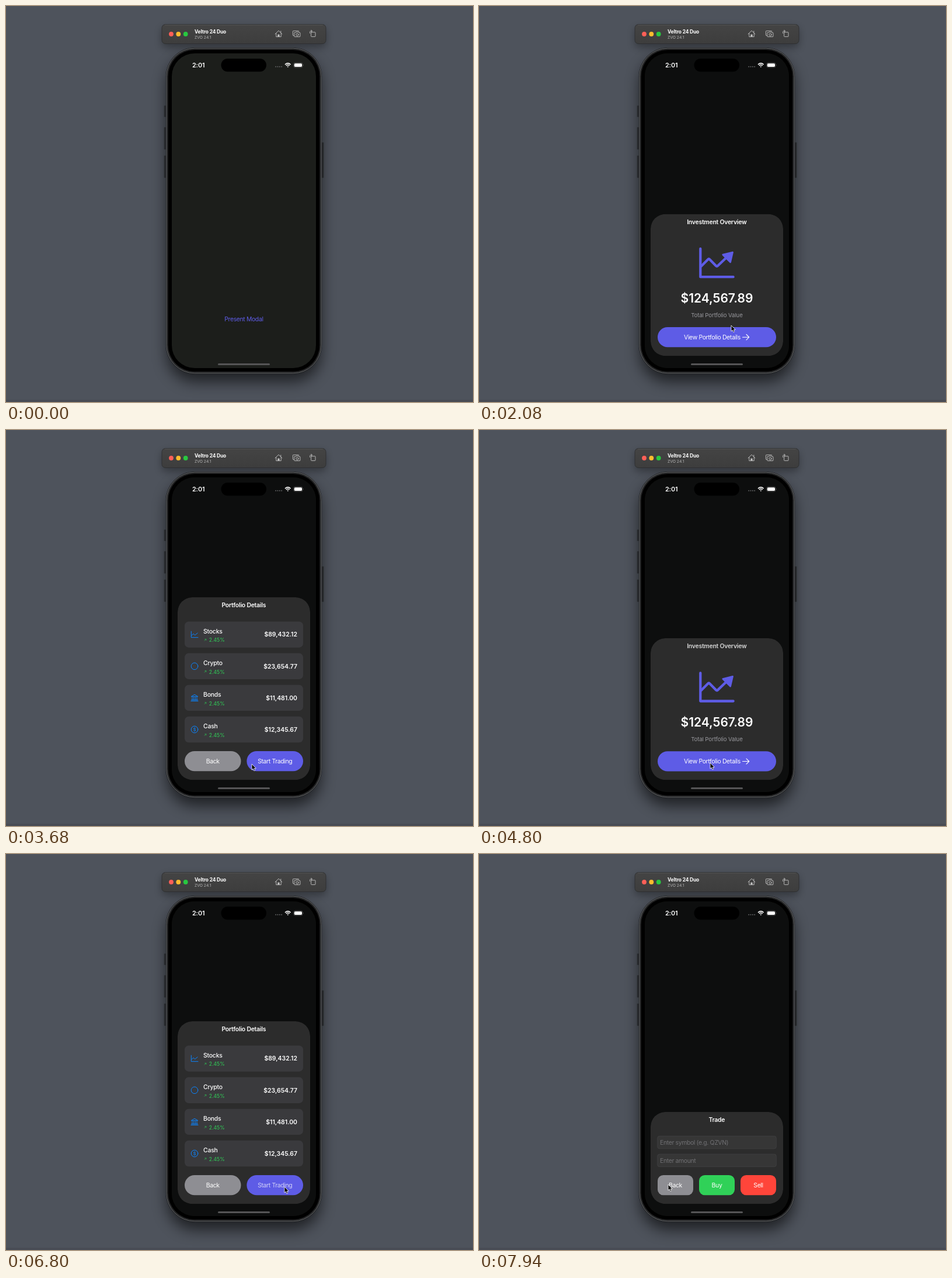
An HTML page for the animation above (8 s loop, 800 px wide and 677 px high).

```html
<!DOCTYPE html>
<html lang="en">
<head>
<meta charset="utf-8">
<title>Sheet demo</title>
<style>
  html, body { margin: 0; width: 100%; height: 100%; overflow: hidden; background: #4e535c; }
  svg { display: block; width: 100vw; height: 100vh; }
  text { font-family: Inter, Roboto, sans-serif; font-size: 10.45px; letter-spacing: -.035em; fill: #fff; }
  .mid { text-anchor: middle; }
  .end { text-anchor: end; letter-spacing: 0; }
  .semi { font-weight: 600; }
  .title { font-weight: 600; letter-spacing: -.023em; }
  .medium { font-weight: 500; letter-spacing: -.02em; }
  .line { fill: none; stroke-linecap: round; stroke-linejoin: round; }
</style>
</head>
<body>
<svg viewBox="0 0 800 677" preserveAspectRatio="none">
  <defs>
    <filter id="blur" x="-30%" y="-30%" width="160%" height="160%"><feGaussianBlur stdDeviation="13"/></filter>
    <filter id="soft" x="-20%" y="-80%" width="140%" height="300%"><feGaussianBlur stdDeviation="7"/></filter>
    <linearGradient id="bar" x2="0" y2="1"><stop stop-color="#444"/><stop offset="1" stop-color="#3d3d3d"/></linearGradient>
    <clipPath id="screenClip"><rect x="284" y="81" width="247" height="538" rx="39"/></clipPath>
    <clipPath id="cardClip"><rect id="clipRect" x="294" width="227" rx="25"/></clipPath>
  </defs>

  <rect width="800" height="677" fill="#4e535c"/>
  <rect y="673" width="800" height="4" fill="#484c55"/>

  <!-- window bar -->
  <rect x="267" y="37" width="281" height="34" rx="7" fill="#000" opacity=".32" filter="url(#soft)"/>
  <rect x="276" y="86" width="263" height="556" rx="48" fill="#000" opacity=".62" filter="url(#blur)"/>
  <rect x="267" y="31.5" width="281" height="33" rx="6" fill="url(#bar)" stroke="#2b2c2e" stroke-width=".8"/>
  <path d="M272 32.4H543" stroke="#626262" stroke-width=".6"/>
  <circle cx="283" cy="48" r="3.9" fill="#ff5f57"/>
  <circle cx="295.3" cy="48" r="3.9" fill="#febc2e"/>
  <circle cx="307.7" cy="48" r="3.9" fill="#28c840"/>
  <text x="323" y="47" style="font-size:8.4px;font-weight:700;letter-spacing:-.015em">Veltro 24 Duo</text>
  <text x="323" y="55.6" style="font-size:6.8px;letter-spacing:0;fill:#b4b4b4">ZVO 24.1</text>
  <g class="line" stroke="#c4c4c4" stroke-width=".9">
    <path d="M461 48L467 42.2L473 48M462.8 46.6V52.6H471.2V46.6M470.8 45.6V42.8"/>
    <path d="M465.9 52.4V49H468.1V52.4" fill="#c4c4c4"/>
    <path d="M493.6 50.5H492.2Q491.4 50.5 491.4 49.7V43.4Q491.4 42.6 492.2 42.6H500.8Q501.6 42.6 501.6 43.4V44"/>
    <path d="M494.7 45.4H496.2L497 44.4H500.7L501.5 45.4H503Q503.9 45.4 503.9 46.2V51.8Q503.9 52.6 503 52.6H494.7Q493.8 52.6 493.8 51.8V46.2Q493.8 45.4 494.7 45.4Z"/>
    <circle cx="498.9" cy="49" r="2.1"/>
    <rect x="522.6" y="44.8" width="7.4" height="7.6" rx=".8"/>
    <path d="M520.6 46.6V44.7Q520.6 42.7 522.6 42.7H524M522.8 41.2L524.4 42.7L522.8 44.2"/>
  </g>

  <!-- device -->
  <g fill="#25272a" stroke="#3d4045" stroke-width=".5">
    <rect x="270.8" y="170" width="4.5" height="20" rx="1"/>
    <rect x="270.8" y="207" width="4.5" height="38.500" rx="1"/>
    <rect x="270.8" y="255.500" width="4.5" height="38.500" rx="1"/>
    <rect x="540" y="233" width="4.4" height="61" rx="1"/>
  </g>
  <rect x="274.2" y="71.500" width="266.500" height="557" rx="49" fill="#202122" stroke="#17181a" stroke-width="1"/>
  <rect x="274.900" y="72.200" width="265.200" height="555.600" rx="48.300" fill="none" stroke="#707274" stroke-width=".9"/>
  <rect x="277.200" y="74.500" width="260.600" height="551" rx="46" fill="#000" stroke="#3b3c3d" stroke-width=".6"/>

  <g clip-path="url(#screenClip)">
    <rect x="284" y="81" width="247" height="538" fill="#1c1e1b"/>
    <text id="present" class="mid" x="407.400" y="538.900" style="fill:#5e5ce6">Present Modal</text>
    <rect id="dim" x="284" y="81" width="247" height="538" fill="#000003"/>
    <g id="card" clip-path="url(#cardClip)">
      <rect id="cardRect" x="294" width="227" rx="25" fill="#2c2c2c"/>
      <g id="pages"></g>
    </g>
    <rect x="363" y="611" width="89" height="3" rx="1.500" fill="#555556"/>
  </g>

  <!-- status bar -->
  <rect x="368.500" y="90" width="77.500" height="22.200" rx="11.100" fill="#000"/>
  <text class="semi" x="319" y="105" style="font-size:10.8px;letter-spacing:-.01em">2:01</text>
  <g id="dots" fill="#626364"></g>
  <g class="line" stroke="#fff" stroke-width="1.500" style="stroke-linecap:butt">
    <path d="M478 100.100Q482.800 95.700 487.600 100.100M479.800 102Q482.800 99.300 485.800 102"/>
    <path d="M481.400 103.600Q482.800 102.500 484.200 103.600L482.800 105Z" fill="#fff" stroke="none"/>
  </g>
  <rect x="492.800" y="97.200" width="15.200" height="7.800" rx="2.500" fill="none" stroke="#777" stroke-width=".6"/>
  <rect x="493.800" y="98.200" width="13.200" height="5.800" rx="1.700" fill="#fff"/>
  <path d="M508.900 99.800Q510 101.100 508.900 102.400Z" fill="#888"/>

  <path id="cursor" d="M0 0V10.100L2.300 8L3.900 11.600L5.700 10.800L4.200 7.400H7.300Z" fill="#000" stroke="#fff" stroke-width=".8" stroke-linejoin="round"/>
</svg>

<script>
const LOOP = 8000, BOTTOM = 598;
const $ = id => document.getElementById(id);
const clamp = v => Math.max(0, Math.min(1, v));
const lerp = (a, b, u) => a + (b - a) * u;
const smooth = u => u * u * (3 - 2 * u);

const text = (x, y, s, attrs = '') => `<text x="${x}" y="${y}" ${attrs}>${s}</text>`;
const title = (y, s) => text(407.4, y, s, 'class="mid title"');

function button(id, x, w, r, fill, label, extra = '', tx = x + w / 2) {
  return `<rect x="${x}" y="549" width="${w}" height="34.300" rx="${r}" fill="${fill}"/>
    <g id="${id}">${text(tx, 569.9, label, 'class="mid"')}${extra}</g>`;
}

const ring = y => `<circle cx="323" cy="${y}" r="5.800"/>`;
const icons = [
  y => `<path d="M317.300 ${y - 5.5}V${y + 5}H329M318 ${y + 1.5}L321 ${y - 1.3}L323.700 ${y + 1}L328.200 ${y - 2.6}"/>`,
  ring,
  y => `<path d="M317.500 ${y - 2.4}L323 ${y - 5.6}L328.500 ${y - 2.4}ZM319 ${y - 1}V${y + 3.4}M321.700 ${y - 1}V${y + 3.4}M324.300 ${y - 1}V${y + 3.4}M327 ${y - 1}V${y + 3.4}M317.600 ${y + 3.7}H328.400M317 ${y + 5.5}H329"/>`,
  y => ring(y) + text(323, y + 2.9, '$', 'class="mid" style="font-size:8px;letter-spacing:0;fill:#0a84ff;stroke:none"')
];

function row([name, amount], i) {
  const y = 349.7 + i * 54.1;
  return `<rect x="306" y="${y - 22.2}" width="203" height="44.400" rx="7" fill="#3a3a3d"/>
    <g class="line" stroke="#0a84ff" stroke-width="1">${icons[i](y)}</g>
    ${text(338, y - 2, name, 'class="medium"')}
    <path class="line" stroke="#30d158" stroke-width=".6" d="M340 ${y + 10.6}L342.800 ${y + 7.8}M340.700 ${y + 7.8}H342.800V${y + 9.9}"/>
    ${text(347.8, y + 12.7, '2.45%', 'style="font-size:8.6px;letter-spacing:0;fill:#30d158"')}
    ${text(499, y + 3.7, amount, 'class="end semi"')}`;
}

const field = (y, hint) => `<rect x="305.700" y="${y}" width="203.600" height="21.500" rx="3.500" fill="#363636" stroke="#444446" stroke-width=".7"/>
  ${text(310, y + 14.6, hint, 'style="fill:#707073"')}`;

const arrow = '<path class="line" stroke="#fff" stroke-width="1.100" d="M451.500 566.200H462.600M458 561.500L462.700 566.200L458 570.900"/>';

// Each page is laid out at its resting place; top is the card's upper edge.
const pages = [
  { top: 355.8, title: title(372.8, 'Investment Overview'), body:
    `<g class="line" stroke="#5e5ce6" stroke-width="4.300">
      <path d="M379.300 415V463.200H435.600"/>
      <path d="M380.500 445L392.200 433.200Q393.700 431.800 395.200 433.200L406 444.300Q407.400 445.700 408.900 444.300L426 428"/>
      <path d="M434.500 421L417.800 425.200L430.600 438Z" fill="#5e5ce6" stroke-width="2.800"/>
    </g>` +
    text(407.4, 507.2, '$124,567.89', 'class="mid semi" style="font-size:21px;letter-spacing:0"') +
    text(407.4, 531.6, 'Total Portfolio Value', 'class="mid" style="font-size:9.6px;letter-spacing:-.01em;fill:#98989d"') +
    button('view', 306, 203, 17.1, '#5e5ce6', 'View Portfolio Details', arrow, 399.5) },
  { top: 286, title: title(302.9, 'Portfolio Details'), body:
    [['Stocks', '$89,432.12'], ['Crypto', '$23,654.77'], ['Bonds', '$11,481.00'], ['Cash', '$12,345.67']].map(row).join('') +
    button('back', 306, 96.5, 17.1, '#8e8e93', 'Back') +
    button('start', 412.4, 96.6, 17.1, '#5e5ce6', 'Start Trading') },
  { top: 441, title: title(457.9, 'Trade'), body:
    field(482.3, 'Enter symbol (e.g. QZVN)') + field(513.2, 'Enter amount') +
    button('cancel', 306, 61, 9.8, '#8e8e93', 'Back') +
    button('buy', 377, 61, 9.8, '#30d158', 'Buy') +
    button('sell', 448, 61, 9.8, '#ff453a', 'Sell') }
];

$('pages').innerHTML = pages.map((p, i) =>
  `<g id="page${i}"><g id="title${i}">${p.title}</g><g id="body${i}">${p.body}</g></g>`).join('');
$('dots').innerHTML = [0, 1, 2, 3].map(i => `<circle cx="${462.2 + i * 3.3}" cy="103.800" r="1"/>`).join('');

const OPEN = 1380, DROP = 263;
const steps = [
  { at: OPEN, page: 0 }, { at: 2740, page: 1 }, { at: 4560, page: 0 },
  { at: 5560, page: 1 }, { at: 6900, page: 2 }
];
const presses = [
  ['present', 1300, 1400], ['view', 2420, 2740], ['back', 4400, 4560],
  ['view', 5500, 5560], ['start', 6800, 6900]
];
const track = [
  [300, 534, 663], [1100, 425, 535], [1120, 425, 535], [1160, 425, 536], [1800, 425, 536],
  [2080, 432, 546], [2120, 432, 546], [2440, 437, 564], [3500, 437, 564],
  [3680, 421, 571], [3860, 421, 571], [4420, 396, 569], [6300, 396, 569],
  [6580, 477, 569], [7440, 477, 569], [7620, 442, 573], [7940, 324, 565]
];

// Remaining share of a lightly underdamped spring.
function spring(ms) {
  if (ms <= 0) return 1;
  const z = .85, w = 22, s = ms / 1000, r = Math.sqrt(1 - z * z), a = w * r * s;
  return Math.exp(-z * w * s) * (Math.cos(a) + z / r * Math.sin(a));
}

function place(t) {
  let i = 0;
  while (i < track.length - 2 && t >= track[i + 1][0]) i++;
  const [a, b] = [track[i], track[i + 1]];
  const u = smooth(clamp((t - a[0]) / (b[0] - a[0])));
  return [lerp(a[1], b[1], u), lerp(a[2], b[2], u)];
}

function draw(t) {
  let k = steps.length - 1;
  while (k > 0 && t < steps[k].at) k--;
  const now = steps[k].page, prev = k ? steps[k - 1].page : -1;
  const age = t - steps[k].at;
  const top = k ? lerp(pages[now].top, pages[prev].top, spring(age)) : pages[0].top;
  const left = spring(t - OPEN);

  $('card').style.display = t < OPEN ? 'none' : '';
  $('card').setAttribute('transform', `translate(0 ${DROP * left})`);
  $('dim').setAttribute('opacity', clamp(.53 * (1 - left)));
  for (const id of ['cardRect', 'clipRect']) {
    $(id).setAttribute('y', top);
    $(id).setAttribute('height', BOTTOM + .2 - top);
  }

  pages.forEach((p, i) => {
    const fade = span => i === now ? (k ? clamp(age / span) : 1) : i === prev ? 1 - clamp(age / (span * .75)) : 0;
    $('page' + i).setAttribute('transform', `translate(0 ${top - p.top})`);
    $('page' + i).style.display = i === now || (i === prev && age < 300) ? '' : 'none';
    $('title' + i).setAttribute('opacity', fade(300));
    $('body' + i).setAttribute('opacity', fade(200));
  });

  for (const [id] of presses) $(id).setAttribute('opacity', 1);
  for (const [id, from, to] of presses)
    if (t >= from && t < to) $(id).setAttribute('opacity', .72);

  $('cursor').style.display = t < 300 ? 'none' : '';
  $('cursor').setAttribute('transform', `translate(${place(t)})`);
}

const begin = performance.now();
function tick() {
  draw((performance.now() - begin) % LOOP);
  requestAnimationFrame(tick);
}
tick();
</script>
</body>
</html>
```
